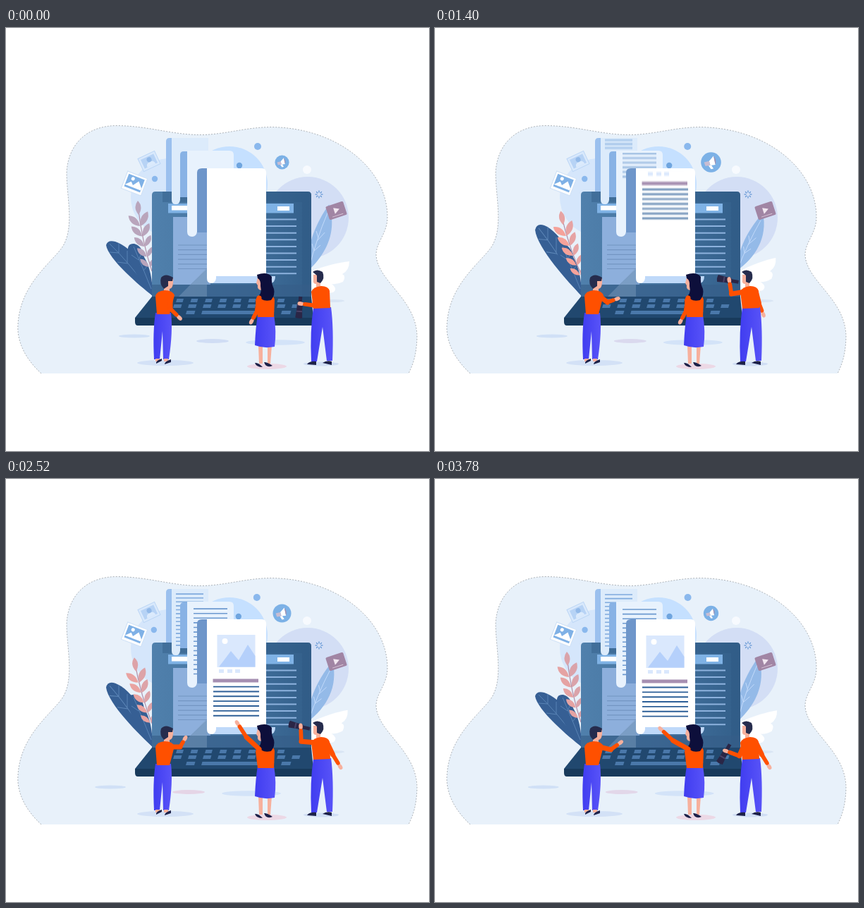
An HTML page for the animation above (3920 ms loop, 600 by 600 pixels).

```html
<!DOCTYPE html>
<html lang="en">
<head>
<meta charset="utf-8">
<title>Publishing team</title>
<style>
html, body { margin: 0; width: 100%; height: 100%; overflow: hidden; background: #fff; }
svg { display: block; width: 100vw; height: 100vh; }
.sleeve { fill: none; stroke: #ff5000; stroke-linecap: round; stroke-linejoin: round; }
.skin { fill: #f7b09c; }
.hair { fill: #262c4d; }
.shoe { fill: #1d2148; }
.cloth { fill: url(#cloth); }
</style>
</head>
<body>
<svg viewBox="0 0 600 600">
  <defs>
    <linearGradient id="screen"><stop stop-color="#5080ac"/><stop offset=".5" stop-color="#44739f"/><stop offset="1" stop-color="#335f8a"/></linearGradient>
    <linearGradient id="cloth"><stop stop-color="#403df0"/><stop offset="1" stop-color="#5853f8"/></linearGradient>
    <clipPath id="c1"><path d="M235 157H287V232H247V250H235Z"/></clipPath>
    <clipPath id="c2"><path d="M257 177H323V280H257Z"/></clipPath>
    <clipPath id="c3"><path d="M285 203H369V352H285Z"/></clipPath>
    <filter id="soft"><feGaussianBlur stdDeviation="1.6"/></filter>
    <filter id="motion" color-interpolation-filters="sRGB"><feGaussianBlur id="smear" stdDeviation="0 0"/></filter>
  </defs>

  <path fill="#e8f1fa" stroke="#4a5058" stroke-width=".6" stroke-opacity=".7" stroke-dasharray="2 2" d="M50 490C28 470 15 445 17 420C20 365 62 335 79 312C98 285 86 240 86 205C88 165 115 138 158 138.5C205 139 235 152 280 151.5C315 150 340 141 375 140.5C470 141 541 200 541 268C541 292 525 303 525 322C527 360 584 385 583 440C582 465 577 478 571 490"/>

  <circle cx="232" cy="240" r="55" fill="#d5e6fb"/>
  <circle cx="317" cy="222" r="54" fill="#c5e0ff"/>
  <circle cx="428" cy="269" r="58" fill="#d3def5"/>
  <circle cx="427" cy="201" r="6" fill="#f7fafe"/>
  <g id="sparkle" stroke="#5c92d2" stroke-width="1.2"></g>

  <g id="shadows">
    <ellipse cx="182" cy="437" rx="22" ry="2.6" fill="#d0e0f6"/>
    <ellipse id="tint" cx="293" cy="444" rx="23" ry="3"/>
    <ellipse cx="382" cy="446" rx="42" ry="3.8" fill="#d3e3f8"/>
  </g>
  <ellipse cx="226" cy="475" rx="40" ry="4" fill="#d3e1f6"/>
  <ellipse cx="370" cy="480" rx="28" ry="4" fill="#ecd8e5"/>
  <ellipse cx="447" cy="476.5" rx="25" ry="3" fill="#d0def4"/>
  <ellipse cx="465" cy="387" rx="15" ry="2" fill="#d9e5f4"/>

  <g id="dots" fill="#8ab8ed">
    <circle cx="212" cy="214" r="4.2"/><circle cx="358" cy="168" r="5"/><circle cx="332" cy="195" r="4.2" fill="#6fa5df"/>
  </g>

  <g transform="translate(203 189) rotate(-25)">
    <rect x="-13" y="-10" width="26" height="20" fill="#d9e9fc" stroke="#bcd6f5"/>
    <rect x="-10" y="-7" width="20" height="14" fill="#b7d3f5"/>
    <path d="M-6 7Q-6 1 1 1Q7 1 7 7Z" fill="#dbeafc"/><circle cx="1" cy="-2" r="3.5" fill="#93bae9"/>
  </g>
  <g transform="translate(182 220.500) rotate(21)">
    <rect x="-15" y="-13" width="30" height="26" fill="#fdfeff" stroke="#cfe1f6"/>
    <rect x="-12" y="-10" width="24" height="19" fill="#7fb1e6"/>
    <path d="M-12 6L-5-1L-1 3L5-5L12 3V6Z" fill="#fff"/><circle cx="-4" cy="-5.5" r="2.5" fill="#fff"/>
  </g>

  <g id="longLeaf">
    <path fill="#365f94" d="M208 380C190 366 145 328 142 308Q144 300 155 303C178 310 205 345 208 380Z"/>
    <path fill="none" stroke="#5d87b8" stroke-width=".9" d="M147 306Q172 330 205 374M160 319V305M172 333V316M160 319L147 318M173 334L158 332"/>
  </g>
  <path fill="#365f94" d="M208 380C190 362 172 330 173 312Q174 305 182 306Q193 309 196 325Q208 345 208 380Z"/>
  <path fill="none" stroke="#5d87b8" stroke-width=".9" d="M181 310Q194 340 206 370M188 329L192 320M188 329L178 322M195 344L200 338"/>
  <g id="fern"></g>
  <g id="paleLeaf">
    <path fill="#94bae8" d="M428 345C426 318 433 286 458 250C470 288 455 320 428 345Z"/>
    <path fill="none" stroke="#c3dafa" d="M430 340Q440 300 456 262M437 316L446 308M441 302L452 290M437 316L434 306M443 298L440 288"/>
  </g>
  <path id="wing" fill="#fff" d="M432 345Q465 333 487 331Q487 344 477 349Q483 352 478 360Q470 364 462 363Q471 370 464 375L436 380Z"/>

  <g transform="translate(468.500 259) rotate(-18)">
    <rect x="-13" y="-10" width="26" height="20" rx="2" fill="#a185a4"/>
    <path d="M-3-5L5-1L-3 4Z" fill="#f1e6f0"/><path d="M-8 7H8" stroke="#d9c4d6"/>
  </g>
  <g id="horn">
    <circle r="16" fill="#7cb1e6"/>
    <path d="M-3-2L4-10L7 4L-1 5ZM-4 5L0 4L4 10L0 11Z" fill="#fff"/>
    <path d="M-11 0L-3-2L-1 5L-9 6Z" fill="#c9bdd2"/><path d="M4-10Q9-4 7 4Z" fill="#a58cab"/>
  </g>
  <g id="flyer" filter="url(#soft)"><path d="M346 170L358 176L371 171L368 187L346 183Z" fill="#3f72b0"/><path d="M346 169H360V178H346Z" fill="#bcd5f4"/></g>

  <path fill="url(#screen)" d="M212 232H428Q433 232 433 237V384H207V237Q207 232 212 232Z"/>
  <path fill="#2d5983" opacity=".4" d="M222 232H428Q433 232 433 237V384H420V247H222Z"/>
  <path fill="#365f89" opacity=".65" d="M207 364H433V384H207Z"/>
  <path fill="#8dafdc" d="M237 268H290V338L262 364H237Z"/>
  <path fill="#7a9fcc" d="M290 338V364H262Z"/>
  <path fill="#7d9cbd" opacity=".45" d="M285 340V384H242Z"/>
  <path fill="#7fb2e5" d="M230 249H408V262.500H230Z"/>
  <path fill="#fff" d="M235 252H258V258.500H235ZM385 253H402V259H385Z"/>
  <g id="sideLines"></g>

  <path fill="#21486f" d="M207 381H433L436 411H183Z"/>
  <path fill="#183a5b" d="M183 411H436V422H187Q183 422 183 417Z"/>
  <g id="keys" fill="#4a78aa"></g>

  <path fill="#9bc0ee" d="M227 232V161Q227 156 232 156H240V232Z"/>
  <path fill="#dcebfb" d="M235 156H287V232H247V244Q246 250 241 250Q235 250 235 244Z"/>
  <g clip-path="url(#c1)"><g id="text1" class="text" stroke="#80abde"></g></g>
  <path fill="#88b2e5" d="M247 240V180Q247 175 252 175H262V240Z"/>
  <path fill="#e8f2fd" d="M257 174H317Q323 174 323 180V285H271V289Q270 296 264 296Q257 296 257 289Z"/>
  <g clip-path="url(#c2)"><g id="text2" class="text" stroke="#6c99d0"></g></g>
  <path fill="#6e96ca" d="M271 290V205Q271 199 278 199H292V290Z"/>
  <path fill="#bfd9f9" d="M292 352H382Q382 362 374 362H292Z"/>
  <path fill="#fff" d="M285 199H363Q369 199 369 205V352H298V355Q297 362 291 362Q285 362 285 355Z"/>
  <g clip-path="url(#c3)"><g id="text3" class="text" stroke="#2d5f97">
    <g stroke="none">
      <path fill="#dae8fd" d="M299.500 222H353.500V268H299.500ZM302 271H309V276H302ZM314 271H321V276H314ZM325 271H332V276H325Z"/>
      <path fill="#b5d0fb" d="M302 267.500L319 245L330 258L343 236L353.500 252V267.500Z"/>
      <circle cx="310.500" cy="231" r="4" fill="#fff"/>
      <path fill="#a68fb1" d="M293.500 284.500H358V289.500H293.500Z"/>
    </g>
  </g></g>

  <!-- left man -->
  <path class="cloth" d="M212 404H234Q237 430 231 470H223L222 430L218 470H210Q208 430 212 404Z"/>
  <path class="skin" d="M212 469H218V473H212ZM224 469H230V473H224ZM224 362H232V376H224ZM226 355H237Q238 369 232 370H226Z"/>
  <path class="shoe" d="M213 476Q212 472 221 469L221 472ZM225 477Q225 473 234 470L234 474Z"/>
  <path fill="#ff5000" d="M212 380Q214 373 225 372Q236 372 239 379L232 406H214Z"/>
  <path class="hair" d="M220 354Q226 347 237 354L236 359H230V366L224 370Q217 363 220 354Z"/>
  <g id="manArm"></g>

  <!-- woman -->
  <path class="skin" d="M358 450H364V476H359ZM371 450H377L375 476H371ZM357 354H368V382H362V372Q356 371 357 365L355 362Z"/>
  <path class="shoe" d="M353 475Q358 474 364 481Q355 481 353 475ZM366 474Q371 474 378 479Q369 483 366 474Z"/>
  <path class="cloth" d="M357 407H380Q384 430 381 452Q366 455 353 450Q354 425 357 407Z"/>
  <path fill="#ff5000" d="M354 386Q356 378 366 377Q380 377 381 386L380 410H357Z"/>
  <path fill="#0d0f3b" d="M356 350Q371 345 377 353Q376 362 380 370Q382 379 376 386Q362 389 359 379Q363 376 361 366Q362 358 357 355Z"/>
  <g id="womanArm"></g>

  <!-- right man -->
  <g id="backArm"></g>
  <path class="cloth" d="M436 396H461Q465 425 463 472H455L449 424L441 473H433Q431 430 436 396Z"/>
  <path class="shoe" d="M427 477Q431 472 440 473V478ZM449 475Q455 471 462 473V478Z"/>
  <path class="skin" d="M436 350H446V370H440V363Q435 363 436 357Z"/>
  <path fill="#ff5000" d="M433 374Q436 367 447 366Q457 366 459 373L460 397L436 398Z"/>
  <path class="hair" d="M435 346Q441 341 449 346Q453 355 446 362L441 360V351Z"/>
  <g id="scope">
    <path fill="#2a2646" d="M-15-2.500H-5L-3-4H4L15-5Q17 0 15 5L4 4H-3L-5 2.500H-15Z"/>
    <path fill="#4b4368" d="M-4-4H-2V4H-4ZM5-4H7V4H5Z"/>
  </g>
  <g id="scopeArm"></g>
</svg>
<script>
const LOOP = 3920, STEP = 140, SWAY = 3220;
const { PI, sin, cos, abs, sqrt, min, max } = Math;
const $ = id => document.getElementById(id);
const put = (id, value) => $(id).setAttribute('transform', value);
const add = (el, markup) => el.insertAdjacentHTML('beforeend', markup);

const ramp = (t, from, to) => min(1, max(0, (t - from) / (to - from)));
const ease = (t, from, to) => { const u = ramp(t, from, to); return u * u * (3 - 2 * u); };
const hump = (t, from, to) => sin(PI * ramp(t, from, to)) ** 2;
const lerp = (a, b, k) => a + (b - a) * k;
const mix = (a, b, k) => `rgb(${a.map((c, i) => Math.round(lerp(c, b[i], k)))})`;

function rules(id, x1, x2, y, gap, count, width, color = '') {
  let d = '';
  for (let i = 0; i < count; i++) d += `M${x1} ${y + i * gap}H${x2}`;
  add($(id), `<path d="${d}" fill="none" stroke-width="${width}" ${color && `stroke="${color}"`}/>`);
}

function buildScene() {
  rules('text1', 241, 280, 164, 5.6, 14, 1.6);
  rules('text2', 266, 314, 185, 6.6, 15, 1.6);
  rules('text3', 294, 359, 295.5, 6.85, 7, 1.9);
  rules('sideLines', 369, 412, 271.5, 9.6, 9, 2, '#8db2de');
  rules('sideLines', 244, 285, 308, 6.7, 6, 1.2, '#7395c2');

  const key = (x, y, w) => add($('keys'), `<path d="M${x + 1.5} ${y}h${w}l-1.500 5h${-w}z"/>`);
  for (let i = 0; i < 8; i++) key(241 + i * 20.5, 384, 9.5);
  for (let i = 0; i < 9; i++) key(237 + i * 21, 392, 11);
  key(255, 401, 12); key(277, 401, 82); key(367, 401, 12); key(390, 401, 13);

  for (let i = 0; i < 8; i++)
    add($('sparkle'), `<path d="M444 233.500v-3" transform="rotate(${i * 45} 444 236)"/>`);

  const fern = $('fern');
  add(fern, '<path d="M187 250Q192 300 207 345" fill="none" stroke="#b08fa8" stroke-width="1.200"/>');
  const leaf = (x, y, turn, size) => add(fern,
    `<path class="leaf" d="M0 0Q-8-11 0-20Q8-11 0 0Z" transform="translate(${x} ${y}) rotate(${turn}) scale(${size})"/>`);
  leaf(188, 265, -3, 1);
  for (let i = 0; i < 5; i++) {
    const y = 281 + i * 14.5, x = 190 + i * 3.2;
    leaf(x, y, -48, 1.1 - i * .06);
    leaf(x + 1, y, 26, 1.15 - i * .12);
  }
}

// The elbow sits off the middle of the shoulder-hand line by the given bend
function arm(id, [sx, sy], [hx, hy], bend) {
  const dx = hx - sx, dy = hy - sy, len = Math.hypot(dx, dy);
  const ex = (sx + hx) / 2 - dy / len * bend, ey = (sy + hy) / 2 + dx / len * bend;
  const a = Math.atan2(hy - ey, hx - ex);
  const wrist = `${hx - 6 * cos(a)} ${hy - 6 * sin(a)}`;
  $(id).innerHTML =
    `<path d="M${wrist}L${hx} ${hy}" stroke="#f7b09c" stroke-width="3.500"/>
     <ellipse class="skin" rx="4.500" ry="2.800" transform="translate(${hx} ${hy}) rotate(${a * 180 / PI})"/>
     <path class="sleeve" stroke-width="7" d="M${sx} ${sy}L${ex} ${ey}"/>
     <path class="sleeve" stroke-width="5.700" d="M${ex} ${ey}L${wrist}"/>`;
}

function drawPages(t) {
  const u = ramp(t, 100, 2640), shift = -138 * (1 - ease(t, 100, 2640));
  $('smear').setAttribute('stdDeviation', `0 ${5.2 * u * (1 - u)}`);
  for (const el of document.querySelectorAll('.text')) {
    el.setAttribute('transform', `translate(0 ${shift})`);
    if (u < 1) el.setAttribute('filter', 'url(#motion)');
    else el.removeAttribute('filter');
  }
}

function drawPlants(t, pulse) {
  const swing = hump(t, 200, 3300), cycle = abs(sin(PI * t / SWAY));
  put('longLeaf', `translate(0 380) scale(1 ${1 + .34 * swing}) translate(0 -380)`);
  put('fern', `translate(${4 * swing} ${13 * swing}) rotate(${-8 * swing} 206 345)`);
  put('paleLeaf', `translate(430 342) rotate(${4.8 + 4.8 * pulse}) scale(${.935 - .065 * pulse}) translate(-430 -342)`);
  put('wing', `rotate(${-6 * cycle} 436 365)`);
  document.querySelectorAll('.leaf').forEach((el, i) =>
    el.setAttribute('fill', mix([185, 165, 188], [246, 162, 154], sqrt(cycle) * (i % 2 ? 1 : .75))));
}

function drawFloaters(t, pulse) {
  put('horn', `translate(391.500 190.500) scale(${(13 + 3 * pulse) / 16})`);
  put('dots', `translate(${-1 - 1.7 * sin(2 * PI * t / 2240)} 0)`);
  $('flyer').setAttribute('opacity', max(0, 1 - abs(t - 1820) / 200));

  const drift = 35.5 * ease(t, 100, 2870) - 8 * ease(t, 2870, 4000);
  put('shadows', `translate(${-drift} 0)`);
  $('tint').setAttribute('fill', mix([208, 221, 244], [230, 213, 230], drift / 35));
}

function drawPeople(t) {
  const raise = ease(t, 600, 1820), wave = hump(t, 1820, SWAY);
  arm('manArm', [233, 380], [lerp(246, 263, raise) - 9 * wave, lerp(411, 374, raise) - 6 * wave], 7);

  const point = ease(t, 1500, 2450);
  const turn = (108 + 122 * point - 15 * ease(t, 3200, 3900)) * PI / 180, reach = 35 + 13 * point;
  arm('womanArm', [359, 383], [359 + reach * cos(turn), 383 + reach * sin(turn)], -3);

  const lift = ease(t, 100, 1850) - ease(t, 2700, 4100), drop = (1 - lift) ** 2;
  const hx = 418 - 8 * sin(PI * drop), hy = 391 - 40 * lift;
  put('scope', `translate(${hx - 1.5} ${hy + 5 * drop}) rotate(${193 - 98 * drop})`);
  arm('scopeArm', [440, 374], [hx, hy], -14);

  const out = ease(t, 900, 1800);
  arm('backArm', [455, 373], [454 + 20 * out, 404 + 4 * out], 1);
}

function draw(t) {
  const pulse = cos(2 * PI * (t - 1050) / (LOOP / 2));
  drawPages(t);
  drawPlants(t, pulse);
  drawFloaters(t, pulse);
  drawPeople(t);
}

buildScene();
const start = performance.now();
let shown = -1;
function tick() {
  const t = Math.floor((performance.now() - start) % LOOP / STEP) * STEP;
  if (t !== shown) draw(shown = t);
  requestAnimationFrame(tick);
}
tick();
</script>
</body>
</html>
```
